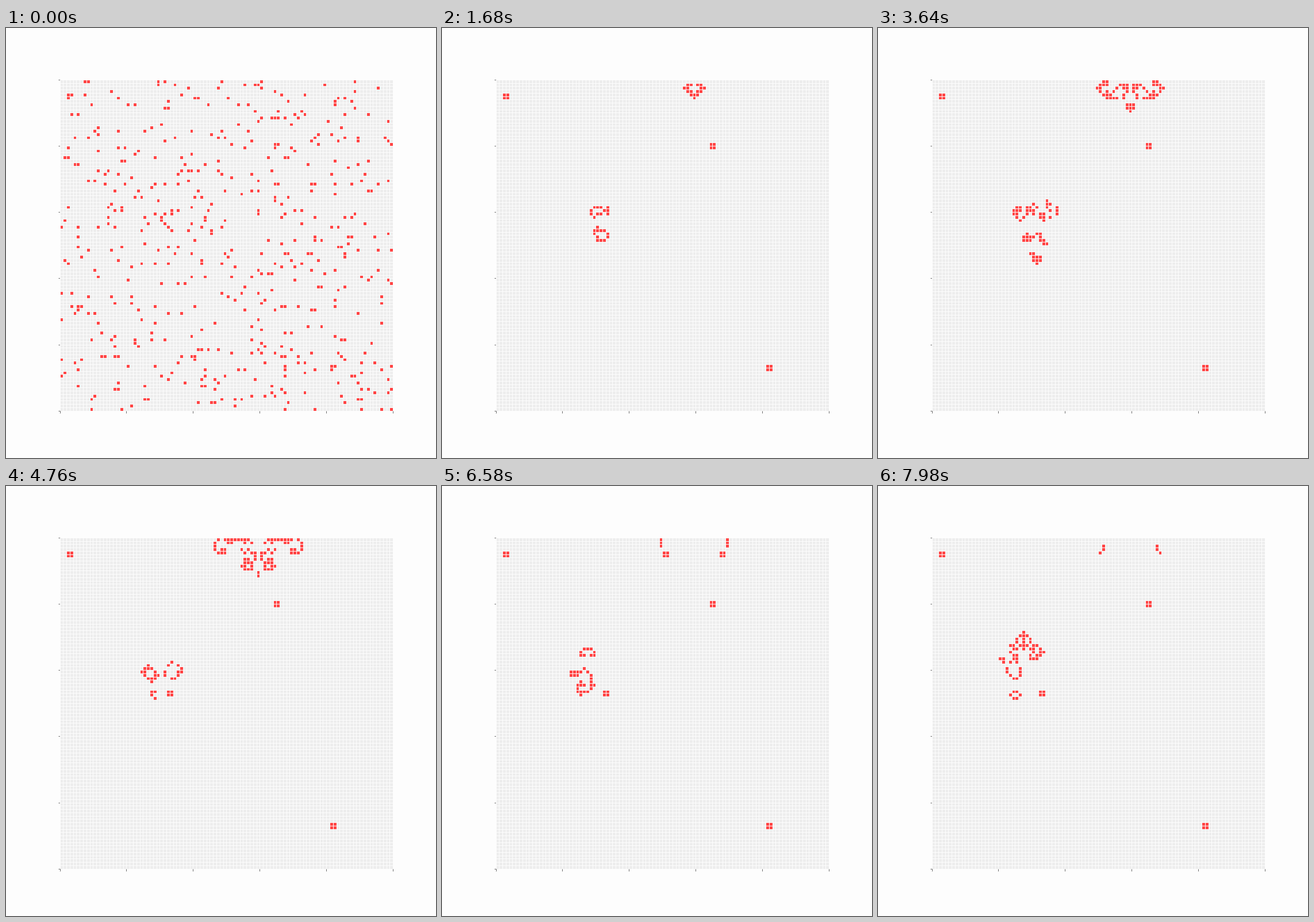
Write a matplotlib script that moves like this. It is 748 px wide and 748 px high and loops after 8 s.

```python
import numpy as np
import matplotlib.pyplot as plt
from matplotlib.animation import FuncAnimation
from matplotlib.collections import LineCollection, PolyCollection

N = 100                     # cells per side
DENSITY = 0.053
PX = 72 / 100               # one pixel in points at 100 dpi
TICK, HOLD, LOOP = 20, 7, 8000
FRAMES = LOOP // TICK

BACK, DEAD, ALIVE = "#fdfdfd", "#ededed", "#ff4444"

# Key points (column, row) from which all lasting life grows
BLOCKS = [(2, 4), (64, 19), (81, 86)]
EDGE = [(60, 0), (58, 1), (59, 1), (60, 2)]
SWARM = [(33, 39), (35, 39), (28, 40), (31, 40), (33, 40),
         (30, 41), (30, 42), (31, 43), (32, 44), (33, 45)]


def step(grid):
    """One Game of Life generation; everything beyond the border is dead."""
    p = np.pad(grid.astype(int), 1)
    total = sum(p[i:i + N, j:j + N] for i in range(3) for j in range(3))
    return (total == 3) | (grid & (total == 4))


def run(grid, steps):
    for _ in range(steps):
        grid = step(grid)
    return grid


def near(mask, r):
    """Every cell within r cells of the mask."""
    p = np.pad(mask, r)
    size = 2 * r + 1
    return np.any([p[i:i + N, j:j + N] for i in range(size)
                   for j in range(size)], axis=0)


def first_generation():
    seeds = np.zeros((N, N), bool)
    for x, y in EDGE + SWARM:
        seeds[y, x] = True
    for x, y in BLOCKS:     # three corners close into a block
        seeds[y, x] = seeds[y, x + 1] = seeds[y + 1, x] = True

    rng = np.random.default_rng(5)
    noise = (rng.random((N, N)) < DENSITY) & ~near(seeds, 2)
    # Thin the noise until it dies out without touching the seeds
    settled = run(seeds, 5)
    while (bad := run(seeds | noise, 5) != settled).any():
        noise &= ~(near(bad, 5) & (rng.random((N, N)) < 0.2))
    return seeds | noise


def squares(grid):
    y, x = np.nonzero(grid)
    corners = np.array([(0, 0), (1, 0), (1, 1), (0, 1)])
    return np.stack([x, y], axis=1)[:, None, :] + corners


generations = []
grid = first_generation()
for _ in range((FRAMES - 1) // HOLD + 1):
    generations.append(squares(grid))
    grid = step(grid)

fig, ax = plt.subplots(figsize=(7.48, 7.48), dpi=100, facecolor=BACK)
fig.subplots_adjust(left=0.125, right=0.9, bottom=0.11, top=0.88)
ax.set(xlim=(0, N), ylim=(N, 0), facecolor=DEAD,
       xticks=range(0, N + 1, 20), yticks=range(0, N + 1, 20))
ax.spines[:].set_visible(False)
ax.tick_params(length=3.5 * PX, width=0.8 * PX, color="#444444",
               labelbottom=False, labelleft=False)

cells = PolyCollection(generations[0], facecolor=ALIVE, edgecolor="none",
                       zorder=1)
ax.add_collection(cells, autolim=False)

rules = [[(k, 0), (k, N)] for k in range(N + 1)]
rules += [[(0, k), (N, k)] for k in range(N + 1)]
ax.add_collection(LineCollection(rules, colors=BACK, linewidths=PX, zorder=2),
                  autolim=False)


def update(i):
    cells.set_verts(generations[i // HOLD])
    return cells,


anim = FuncAnimation(fig, update, frames=FRAMES, interval=TICK, repeat=True,
                     repeat_delay=0)
plt.show()
```
